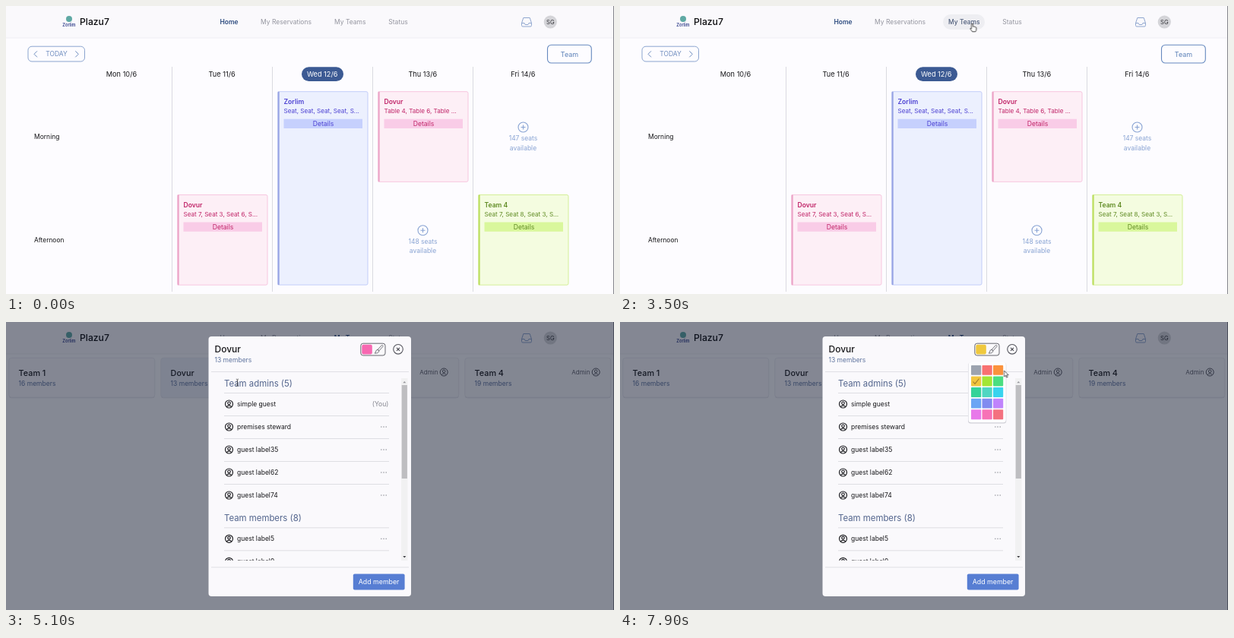
An HTML page for the animation above (8000 ms loop, 800 by 379 pixels).

```html
<!DOCTYPE html>
<html lang="en">
<head>
<meta charset="utf-8">
<title>Seat booking</title>
<style>
html, body { margin: 0; width: 100%; height: 100%; overflow: hidden; background: #fdfcff; }
svg { display: block; width: 100vw; height: 100vh; font-family: Inter, sans-serif; }

/* 1.25% of the loop is 100 ms */
.home, .teams, .pill, .point, .hover, .modal, .idle, .focus, .palette, .before, .after, .arrow, .hand, .beam {
  animation: 8s step-end infinite;
}
.home { animation-name: home; }
.teams { animation-name: teams; }
.pill { animation-name: pill; }
.point { animation-name: point; }
.hover { animation-name: hover; }
.modal { animation-name: modal; }
.idle { animation-name: idle; }
.focus { animation-name: focus; }
.palette { animation-name: palette; }
.before { animation-name: before; }
.after { animation-name: after; }
.arrow { animation-name: arrow; }
.hand { animation-name: hand; }
.beam { animation-name: beam; }
.cursor { animation: path 8s infinite; }

@keyframes home { 0% { visibility: visible } 47.5%, 100% { visibility: hidden } }
@keyframes teams { 0% { visibility: hidden } 47.5%, 100% { visibility: visible } }
@keyframes pill { 0% { visibility: hidden } 42.5% { visibility: visible } 50%, 100% { visibility: hidden } }
@keyframes point { 0% { visibility: hidden } 42.5% { visibility: visible } 47.5%, 100% { visibility: hidden } }
@keyframes hover { 0% { opacity: 0 } 52.5% { opacity: 1 } 63.75% { opacity: .5 } 65%, 100% { opacity: 0 } }
@keyframes modal { 0% { visibility: hidden } 63.75%, 100% { visibility: visible } }
@keyframes idle { 0% { opacity: 1 } 73.75% { opacity: 0 } 78.75%, 100% { opacity: 1 } }
@keyframes focus { 0% { opacity: 0 } 73.75% { opacity: 1 } 78.75%, 100% { opacity: 0 } }
@keyframes palette { 0% { visibility: hidden } 76.25%, 100% { visibility: visible } }
@keyframes before { 0% { opacity: 1 } 93.75%, 100% { opacity: 0 } }
@keyframes after { 0% { opacity: 0 } 93.75%, 100% { opacity: 1 } }
@keyframes arrow {
  0% { visibility: hidden } 26.25% { visibility: visible } 42.5% { visibility: hidden }
  50% { visibility: visible } 52.5% { visibility: hidden } 67.5% { visibility: visible }
  73.75% { visibility: hidden } 96.25%, 100% { visibility: visible }
}
@keyframes hand {
  0% { visibility: hidden } 42.5% { visibility: visible } 50% { visibility: hidden }
  52.5% { visibility: visible } 63.75% { visibility: hidden }
  73.75% { visibility: visible } 96.25%, 100% { visibility: hidden }
}
@keyframes beam { 0% { visibility: hidden } 63.75% { visibility: visible } 67.5%, 100% { visibility: hidden } }
@keyframes path {
  0%, 26.25% { transform: translate(640px, 170px); animation-timing-function: steps(5) }
  32.5% { transform: translate(600px, 250px); animation-timing-function: steps(3) }
  36.25% { transform: translate(585px, 284px); animation-timing-function: steps(5) }
  42.5%, 48.75% { transform: translate(463.5px, 23px); animation-timing-function: steps(4) }
  53.75%, 55% { transform: translate(314px, 75px); animation-timing-function: steps(2) }
  57.5%, 65% { transform: translate(304px, 77.5px); animation-timing-function: steps(6) }
  72.5% { transform: translate(470px, 43px); animation-timing-function: steps(1) }
  73.75%, 77.5% { transform: translate(478px, 38px); animation-timing-function: steps(7) }
  86.25%, 95% { transform: translate(466px, 76px); animation-timing-function: steps(3) }
  98.75%, 100% { transform: translate(505.5px, 64px) }
}
</style>
</head>
<body>
<svg id="stage" viewBox="0 0 800 379" preserveAspectRatio="none"></svg>
<script>
const text = (x, y, s, size, fill, more = '') =>
  `<text x="${x}" y="${y}" font-size="${size}" fill="${fill}" ${more}>${s}</text>`;
const rect = (x, y, w, h, fill, r = 0, more = '') =>
  `<rect x="${x}" y="${y}" width="${w}" height="${h}" rx="${r}" fill="${fill}" ${more}/>`;
const circle = (x, y, r, fill, more = '') =>
  `<circle cx="${x}" cy="${y}" r="${r}" fill="${fill}" ${more}/>`;
const line = (d, stroke, width = 1, more = '') =>
  `<path d="${d}" fill="none" stroke="${stroke}" stroke-width="${width}" ${more}/>`;
const group = (cls, ...parts) => `<g class="${cls}">${parts.join('')}</g>`;
const mid = 'text-anchor="middle"', end = 'text-anchor="end"';
const medium = 'font-weight="500"', semi = 'font-weight="600"';

const INK = '#18181b', GREY = '#94959f', NAVY = '#2f4d80', BLUE = '#88a3d3', SLATE = '#5f749f', HEADING = '#53658d';

function userIcon(x, y, stroke, width = 1) {
  return circle(x, y, 5, 'none', `stroke="${stroke}" stroke-width="${width}"`) +
    circle(x, y - 1.2, 1.8, 'none', `stroke="${stroke}" stroke-width="${width}"`) +
    line(`M${x - 3.3} ${y + 3.6}q3.3 -3.6 6.6 0`, stroke, width);
}

function header() {
  return rect(0, 0, 800, 42, '#faf9fc') + rect(0, 41.5, 800, 1, '#f0eff3') +
    circle(83, 17, 4, '#5fa9a4') +
    text(83, 27, 'Zorlim', 5.6, '#34408c', `${mid} ${semi}`) +
    text(97, 25, 'Plazu7', 12.2, '#0c0c0f', medium) +
    line('M678.5 22.5l2.3 -7h8.4l2.3 7v3q0 1.5 -1.5 1.5h-10q-1.5 0 -1.5 -1.5zh3.6l1 2h3.8l1 -2h3.6', '#8fa6cf') +
    circle(716.3, 21, 8.6, '#d4d4d8') +
    text(716.3, 23.8, 'SG', 7.6, '#333338', mid);
}

function nav(active) {
  return [['Home', 293.5], ['My Reservations', 368.5], ['My Teams', 452.8], ['Status', 516]]
    .map(([s, x]) => s === active
      ? text(x, 24, s, 8.5, NAVY, `${mid} ${semi}`)
      : text(x, 24, s, 8.5, GREY, mid)).join('');
}

const TONES = {
  blue: { bg: '#ecf0fe', edge: '#c2cdf9', side: '#98a4e4', bar: '#c6d0fd', ink: '#4a3fd2' },
  pink: { bg: '#fdeff6', edge: '#f7c6df', side: '#eca5c8', bar: '#f9cce7', ink: '#c02468' },
  lime: { bg: '#f4fce0', edge: '#d4ef97', side: '#bddf62', bar: '#d9f79c', ink: '#5f8a22' }
};

function booking(x, y, h, tone, name, seats) {
  const c = TONES[tone];
  return rect(x + .5, y, 118, h, c.bg, 2, `stroke="${c.edge}"`) +
    rect(x, y - .3, 2.2, h + .6, c.side, 1) +
    text(x + 8, y + 16, name, 8.6, c.ink, semi) +
    text(x + 8, y + 28.5, seats, 8.1, c.ink) +
    rect(x + 8, y + 36, 103.5, 12.3, c.bar) +
    text(x + 60, y + 45.3, 'Details', 8.6, c.ink, mid);
}

function freeSlot(x, y, n) {
  return circle(x, y, 6.5, 'none', `stroke="${BLUE}" stroke-width="1.1"`) +
    line(`M${x - 3} ${y}h6M${x} ${y - 3}v6`, BLUE, 1.1) +
    text(x, y + 17.5, n + ' seats', 8.5, BLUE, mid) +
    text(x, y + 30, 'available', 8.5, BLUE, mid);
}

function calendar() {
  const days = ['Mon 10/6', 'Tue 11/6', 'Wed 12/6', 'Thu 13/6', 'Fri 14/6'];
  return rect(29, 53.2, 74.5, 19.8, 'none', 5, 'stroke="#8ba4cf"') +
    text(66.5, 66.2, 'TODAY', 8.5, '#6f8dbf', mid) +
    line('M41 59.3l-4 4 4 4M91.3 59.3l4 4 -4 4', '#6f8dbf') +
    rect(712.5, 51.2, 57.8, 23.8, 'none', 5, 'stroke="#6689bf" stroke-width="1.1"') +
    text(741.5, 66.5, 'Team', 9, '#5c80b8', mid) +
    rect(389, 80.3, 55, 18.8, '#3c5a93', 9.4) +
    days.map((d, i) => text(152 + i * 132.1, 93, d, 9.2, i === 2 ? '#fff' : INK, mid)).join('') +
    [218, 350, 482, 614].map(x => rect(x, 80, 1, 296, '#dadae0')).join('') +
    text(37, 175, 'Morning', 8.5, INK) + text(37, 311, 'Afternoon', 8.4, INK) +
    booking(357.5, 112.7, 254.3, 'blue', 'Zorlim', 'Seat, Seat, Seat, Seat, S...') +
    booking(489.5, 112.7, 118.6, 'pink', 'Dovur', 'Table 4, Table 6, Table ...') +
    booking(225.5, 248.5, 118.6, 'pink', 'Dovur', 'Seat 7, Seat 3, Seat 6, S...') +
    booking(621.5, 248.5, 118.6, 'lime', 'Team 4', 'Seat 7, Seat 8, Seat 3, S...') +
    freeSlot(680.5, 159.5, 147) + freeSlot(548.5, 295.3, 148);
}

function teamCards() {
  return [['Team 1', 16], ['Dovur', 13], ['Zorlim', 12], ['Team 4', 19]].map(([name, n], i) => {
    const x = 3.8 + i * 200;
    return rect(x, 48, 192, 52.3, '#e3e3e9', 3.5) +
      rect(x, 47.2, 192, 52, '#faf9fc', 3.5, 'stroke="#e9e9ef" stroke-width=".8"') +
      (i === 1 ? rect(x, 47, 192, 52.6, '#e4eaf4', 3.5, 'class="hover"') : '') +
      text(x + 12.8, 71, name, 10.8, INK, medium) +
      text(x + 12.8, 83.5, n + ' members', 8.5, SLATE) +
      (i ? text(x + 140.5, 69, 'Admin', 8, '#62636c') + userIcon(x + 172.4, 66, '#55565e') : '');
  }).join('');
}

function memberRow(y, name, own) {
  return rect(287, y - 15, 217, 1, '#dedee3') + userIcon(293.5, y, '#1c1c20', 1.15) +
    text(304, y + 3, name, 8.5, INK) +
    (own ? text(503.5, y + 3, '(You)', 8.6, '#85868f', end)
      : [493.8, 497, 500.2].map(x => circle(x, y, .8, '#94959d')).join(''));
}

function colorButton(cls, stroke, swatches) {
  const brush = 'M495.4 30.6q1.2 .8 .2 2l-4.6 5.2 -1.8 -1.6 4.8 -5.2q.7 -.8 1.4 -.4zM489 36.4l1.8 1.7q.2 3.2 -5.8 3q1.6 -.9 1.7 -2.6q.3 -2 2.3 -2.1z';
  return group(cls, swatches,
    rect(466.8, 28.2, 32.2, 15.8, 'none', 3, `stroke="${stroke}"`), line(brush, stroke, .9));
}

function dialog() {
  const admins = ['simple guest', 'premises steward', 'guest label35', 'guest label62', 'guest label74'];
  const swatch = (fill, more) => rect(468.3, 29.7, 13.5, 12.7, fill, 2, more);
  return rect(0, 0, 800, 379, '#0f172a', 0, 'opacity=".5"') +
    rect(266.5, 19, 266.5, 342, '#faf9fc', 4) +
    text(274.5, 40, 'Dovur', 12, INK, medium) +
    text(274.5, 53.2, '13 members', 8.5, SLATE) +
    colorButton('idle', '#66676e', swatch('#f768b1', 'class="before"') + swatch('#efc83e', 'class="after"')) +
    colorButton('focus', '#3a3a40', swatch('#e55fa5')) +
    circle(516, 35.8, 6.3, 'none', 'stroke="#55565e" stroke-width="1.1"') +
    line('M514 33.8l4 4m0 -4l-4 4', '#44454c', 1.1) +
    rect(270, 65, 260, 1, '#e0e0e5') + rect(270, 322.3, 260, 1, '#e0e0e5') +
    `<clipPath id="list"><path d="M270 66h260v247.8h-260z"/></clipPath><g clip-path="url(#list)">` +
    text(287, 85, 'Team admins (5)', 11.4, HEADING) +
    admins.map((n, i) => memberRow(108 + 30 * i, n, !i)).join('') +
    text(287, 262.4, 'Team members (8)', 11.4, HEADING) +
    memberRow(285.3, 'guest label5') + memberRow(315.3, 'guest label9') + '</g>' +
    rect(520, 74, 8.5, 240, '#f1f1f2') + rect(520.7, 83, 7.2, 123, '#bebec1') +
    '<path d="M522.3 80.3l2 -2.3 2 2.3z" fill="#96969b"/><path d="M522.3 308l2 2.3 2 -2.3z" fill="#3a3a3e"/>' +
    rect(456.8, 331.6, 67.8, 20.8, '#577ed3', 2) +
    text(490.6, 345.2, 'Add member', 8.8, '#fff', mid);
}

function palette() {
  const colors = ['9ca3af', 'f87171', 'fb923c', 'f2c53d', 'a3e635', '4ade80', '34d399', '4fd6c2',
    '38d3ee', '6aa5f4', '818cf0', 'c084fc', 'e879ea', 'f772b6', 'f4717f'];
  const tick = (x, y, c, cls) => line(`M${x - 4} ${y + .5}l2.5 2.8 5.5 -6.8`, c, 1.1, `class="${cls}"`);
  return rect(458, 53.5, 50.3, 80, '#cfcfd6', 3.5) + rect(458.5, 53, 49.3, 79.3, '#fdfdff', 3.5) +
    colors.map((c, i) =>
      rect(462 + i % 3 * 14.5, 56.9 + Math.floor(i / 3) * 14.6, 13.2, 12.9, '#' + c, .8)).join('') +
    tick(483, 121.8, '#b53a7c', 'before') + tick(468.5, 78, '#a07c2a', 'after');
}

function cursors() {
  const hand = 'M-1 .8q1 -1.4 2 0v3.4q1 -.7 1.6 .2q1 -.5 1.5 .4q1.3 -.2 1.2 1v2.2q0 1.6 -1 2.8h-4.3q-.8 -1.6 -2.6 -3.6q-.5 -1.4 1.6 -.4z';
  return group('arrow', '<path d="M0 0v8l1.9 -1.7 1.3 2.8 1.3 -.6 -1.3 -2.7h2.5z" fill="#fff" stroke="#333" stroke-width=".8"/>') +
    group('hand', `<path d="${hand}" fill="#fff" stroke="#333" stroke-width=".9"/>`) +
    group('beam', line('M-1.2 -2.2q1.4 0 1.6 .8q.2 -.8 1.6 -.8M.4 -1.6v7.6M-1.2 6.6q1.4 0 1.6 -.8q.2 .8 1.6 .8', '#333', .8));
}

document.getElementById('stage').innerHTML =
  rect(0, 0, 800, 379, '#fdfcff') + header() +
  group('pill', rect(425, 11, 55, 20, '#eeeef2', 10)) +
  group('home', nav('Home'), calendar()) +
  group('point', text(452.8, 24, 'My Teams', 8.5, '#566786', mid)) +
  group('teams', nav('My Teams'), teamCards()) +
  rect(799, 0, 1, 379, '#85858c') +
  group('modal', dialog()) + group('palette', palette()) +
  group('cursor', cursors());
</script>
</body>
</html>
```
